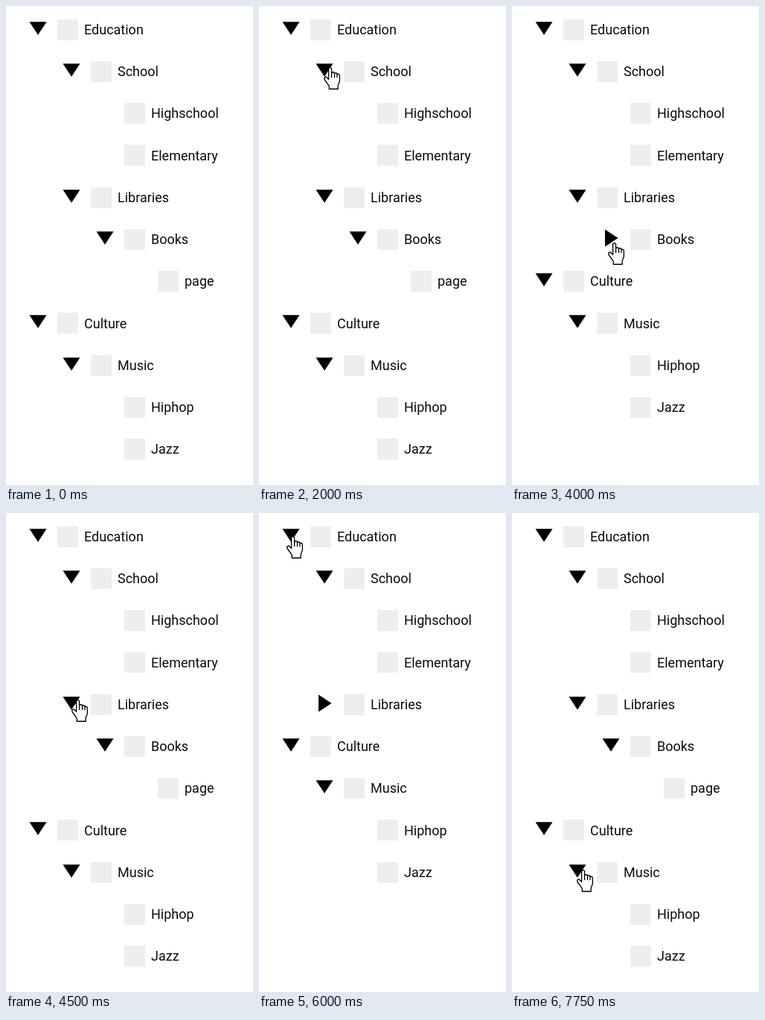
An HTML page for the animation above (8 s loop, 332 by 642 pixels).

```html
<!DOCTYPE html>
<html lang="en">
<head>
<meta charset="utf-8">
<title>Collapsible tree</title>
<style>
  html, body { margin: 0; width: 100%; height: 100%; overflow: hidden; background: #fff; }
  svg { display: block; width: 332px; height: 642px; }
  text { font: 18px Roboto, Arial, sans-serif; fill: #0b0b0b; }
  .box { fill: #eee; }
  .hand { fill: #fff; stroke: #000; stroke-linejoin: round; stroke-linecap: round; }
</style>
</head>
<body>
<svg viewBox="0 0 332 642">
  <g id="tree"></g>
  <g id="cursor">
    <path class="hand" transform="scale(1.32 1.36)" d="M5 12V2Q5 .5 6.5 .5T8 2V6Q8 5 9.5 5T11 6.5Q11 5.7 12.3 5.7T13.6 7.2Q13.8 6.7 14.9 6.8T16.2 8.3V14L14.5 18V21.5H5.5V18.5L1 12.5Q0 10.5 1.2 9.8T3.5 10.5ZM8 6V10M11 6.5V10M13.6 7.2V10"/>
  </g>
</svg>
<script>
const LOOP = 8000;
const TICK = 250;
const ROW = 56.25;
const INDENT = 45;

const nodes = [
  ['Education', 0], ['School', 1], ['Highschool', 2], ['Elementary', 2],
  ['Libraries', 1], ['Books', 2], ['page', 3],
  ['Culture', 0], ['Music', 1], ['Hiphop', 2], ['Jazz', 2]
].map(([label, depth]) => ({ label, depth }));

// start time, cursor left, cursor top, collapsed node
const steps = [
  [0, null, null, ''],
  [500, 187, 585, ''],
  [750, 167, 440, ''],
  [1000, 142, 290, ''],
  [1250, 115, 165, ''],
  [1500, 94, 96, ''],
  [1750, 82, 84, ''],
  [2000, 87, 82, ''],
  [2500, 87, 82, 'School'],
  [3000, 87, 82, ''],
  [3250, 98, 140, ''],
  [3500, 118, 250, ''],
  [3750, 129, 317, ''],
  [4000, 129, 317, 'Books'],
  [4250, 129, 317, ''],
  [4500, 88, 250, ''],
  [4750, 85, 248, 'Libraries'],
  [5000, 62, 140, 'Libraries'],
  [5250, 37, 31, 'Libraries'],
  [5500, 37, 31, 'Education'],
  [6000, 37, 31, 'Libraries'],
  [6250, 60, 120, 'Libraries'],
  [6500, 87, 230, 'Libraries'],
  [6750, 91, 246, 'Libraries'],
  [7000, 91, 246, ''],
  [7250, 37, 31, 'Education'],
  [7500, 37, 31, ''],
  [7750, 87, 478, '']
];

const tree = document.getElementById('tree');
const cursor = document.getElementById('cursor');

function visibleNodes(collapsed) {
  let hiddenBelow = Infinity;
  return nodes.filter(node => {
    if (node.depth > hiddenBelow) return false;
    hiddenBelow = node.label === collapsed ? node.depth : Infinity;
    return true;
  });
}

function hasChildren(node) {
  const next = nodes[nodes.indexOf(node) + 1];
  return next && next.depth > node.depth;
}

function arrow(x, y, closed) {
  const shape = closed ? 'M35 .5L52.5 12L35 23.5Z' : 'M31.5 3.3H54.5L43 20.8Z';
  return `<path transform="translate(${x} ${y})" d="${shape}"/>`;
}

function row(node, index, collapsed) {
  const x = node.depth * INDENT;
  const top = Math.floor(18 + index * ROW);
  const baseline = Math.floor(38.3 + index * ROW);
  return (hasChildren(node) ? arrow(x, top, node.label === collapsed) : '') +
    `<rect class="box" x="${x + 69}" y="${top}" width="28" height="28"/>` +
    `<text x="${x + 105}" y="${baseline}">${node.label}</text>`;
}

function draw([, left, top, collapsed]) {
  tree.innerHTML = visibleNodes(collapsed)
    .map((node, index) => row(node, index, collapsed)).join('');
  cursor.style.display = left === null ? 'none' : '';
  if (left !== null) cursor.setAttribute('transform', `translate(${left} ${top})`);
}

let shown;
const start = performance.now();

function frame(now) {
  const time = Math.max(0, now - start) % LOOP;
  const step = steps.findLast(([begin]) => begin <= time);
  if (step !== shown) draw(shown = step);
  requestAnimationFrame(frame);
}

frame(start);
</script>
</body>
</html>
```
